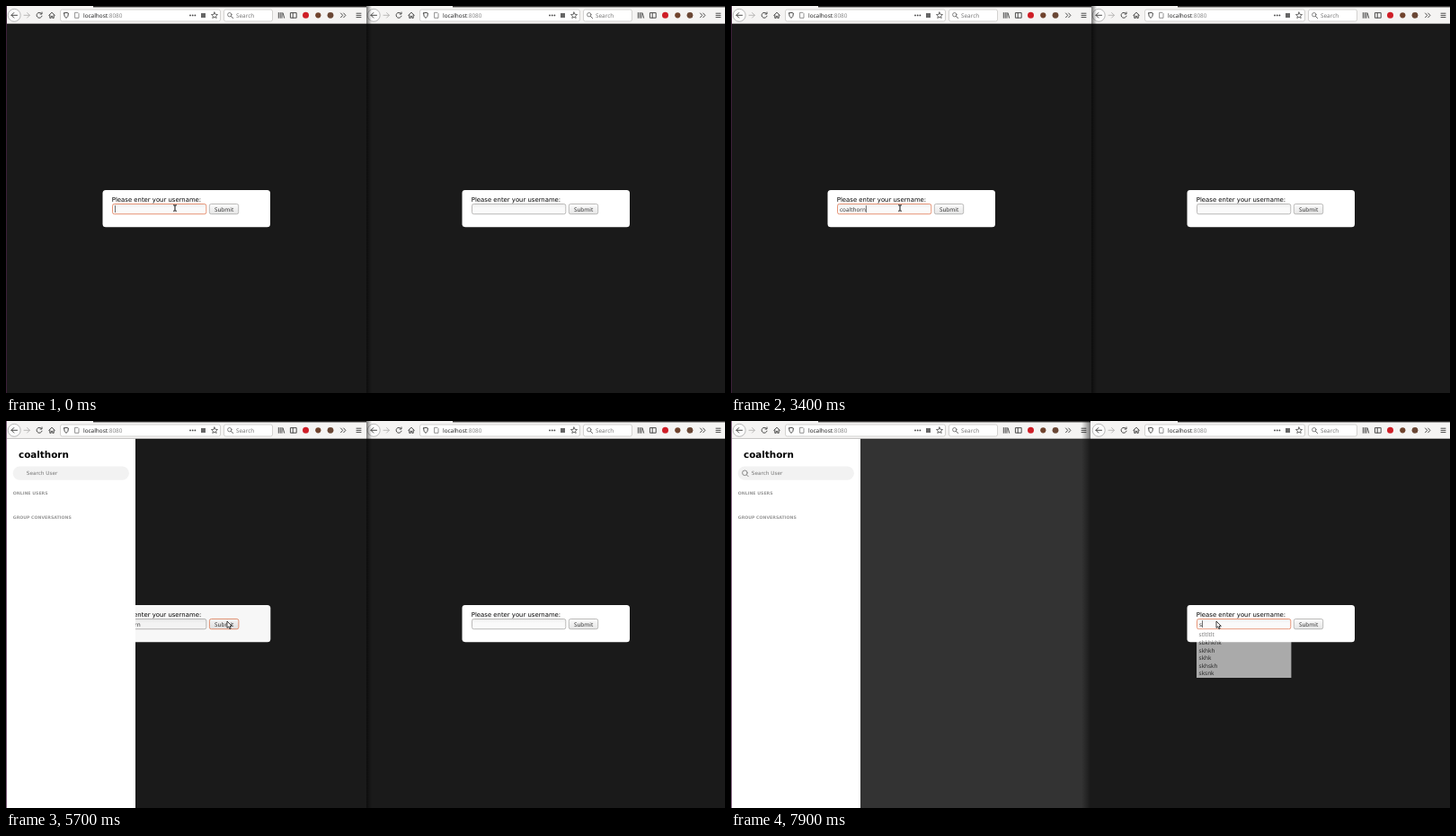
Write an HTML page that moves like this. It is 800x431 px and loops after 8000 ms.

```html
<!DOCTYPE html>
<html lang="en">
<head>
<meta charset="utf-8">
<title>Chat login in two windows</title>
<style>
  html, body { margin: 0; width: 100%; height: 100%; overflow: hidden; background: #1a1a1a; }
  svg { display: block; width: 800px; height: 431px; text-rendering: geometricPrecision; }
  .ui { font: 6.4px "Noto Sans", sans-serif; }
  .page { font: 6.88px "DejaVu Sans", sans-serif; }
  .icon { fill: none; stroke: #4b4b4a; stroke-width: 1; stroke-linecap: round; stroke-linejoin: round; }
</style>
</head>
<body>
<svg viewBox="0 0 800 431">
  <defs>
    <linearGradient id="field" x2="0" y2="1"><stop stop-color="#ededed"/><stop offset=".4" stop-color="#fafafa"/></linearGradient>
    <linearGradient id="button" x2="0" y2="1"><stop stop-color="#fcfcfc"/><stop offset="1" stop-color="#e6e6e6"/></linearGradient>
    <linearGradient id="shadow"><stop stop-opacity=".5"/><stop offset="1" stop-opacity="0"/></linearGradient>
  </defs>
  <g id="stage"></g>
</svg>
<script>
const LOOP = 8000, USER = 'coalthorn', ORANGE = '#e58a68';
const KEY_TIMES = [1700, 2100, 2200, 2300, 2700, 2900, 3000, 3300, 3400];
const SUGGESTIONS = ['stltltlt', 'sbkhkhk', 'skhkh', 'skhk', 'skhskh', 'sksnk'];
// Pointer path: time, x, y
const PATH = [
  [0, 188, 225], [4200, 188, 225], [4400, 195, 228], [4700, 218, 231.5], [5000, 238, 226],
  [5100, 239.5, 223], [5600, 239.5, 223], [5700, 246, 223], [5800, 335, 227], [5900, 441, 226],
  [6100, 505, 227], [6400, 538.5, 225], [7700, 538.5, 225], [7800, 540, 223], [8000, 540, 223]
];
const stage = document.getElementById('stage');
const ruler = document.createElement('canvas').getContext('2d');
ruler.font = '64px "Noto Sans", sans-serif';
const textWidth = s => ruler.measureText(s).width / 10;

const rect = (x, y, w, h, fill, extra = '') =>
  `<rect x="${x}" y="${y}" width="${w}" height="${h}" fill="${fill}" ${extra}/>`;
const box = (x, y, w, h, fill, stroke, r = 2) =>
  rect(x, y, w, h, fill, `rx="${r}" stroke="${stroke}" stroke-width=".9"`);
const text = (x, y, s, fill = '#111', cls = 'ui', style = '') =>
  `<text x="${x}" y="${y}" fill="${fill}" class="${cls}" style="${style}">${s}</text>`;
const icon = (d, extra = '') => `<path class="icon" d="${d}" ${extra}/>`;
const dot = (x, y, r, fill) => `<circle cx="${x}" cy="${y}" r="${r}" fill="${fill}"/>`;

function toolbar(active) {
  const dark = active ? '#2b2928' : '#3c3a39';
  return rect(0, 0, 401, 19.5, '#f5f4f3') + rect(97, 0, 304, 1.4, dark) +
    rect(0, 19, 401, .6, '#c9c7c5') +
    `<circle cx="9.2" cy="10.3" r="7" fill="#fcfcfc" stroke="#aaa" stroke-width=".8"/>` +
    icon('M12.5 10.3H6M8.8 7.5L6 10.3L8.8 13.1') +
    icon('M20 10.3H26.3M23.6 7.5L26.4 10.3L23.6 13.1', 'style="stroke:#b9b8b7"') +
    icon('M39.4 8.3A3 3 0 1 0 40 11.2M40 7V9H38') +
    icon('M47.7 10.4L51 7.2L54.3 10.4M48.8 10V13.4H50.2V11.4H51.8V13.4H53.2V10') +
    box(60.5, 4, 178, 13, '#fff', '#cfcdcb') + box(242.5, 4, 54, 13, '#fff', '#cfcdcb') +
    icon('M64.6 8L67 7.3L69.4 8Q69.6 12 67 13.5Q64.4 12 64.6 8Z', 'stroke-width=".8"') +
    icon('M77 7.3H79.8L81 8.5V13.3H77Z', 'style="stroke:#777;stroke-width:.8"') +
    text(86, 12.7, 'localhost<tspan fill="#888">:8080</tspan>', '#222') +
    dot(205, 10.4, .9, '#444') + dot(207.7, 10.4, .9, '#444') + dot(210.4, 10.4, .9, '#444') +
    rect(217, 8, 5, 5, '#666') +
    icon('M232 7L233 9.3L235.5 9.5L233.6 11.1L234.2 13.5L232 12.2L229.8 13.5L230.4 11.1L228.5 9.5L231 9.3Z', 'style="stroke-width:.8"') +
    icon('M250.4 11.4L252.6 13.6', 'style="stroke:#666"') +
    `<circle cx="248.8" cy="9.7" r="2.2" class="icon" style="stroke:#666;stroke-width:.8"/>` +
    text(256, 12.7, 'Search', '#777') +
    icon('M303.3 7.5V13.3M305.2 7.5V13.3M307 7.5V13.3M308.2 8L309.6 13.2') +
    icon('M316.8 7.6H323.2V13.2H316.8ZM319.2 7.6V13.2') +
    dot(333.5, 10.3, 3.5, '#cf1e27') + dot(347.3, 10.3, 3.1, '#70432d') + dot(361, 10.3, 3.4, '#6a4735') +
    icon('M372.5 8L374.7 10.4L372.5 12.8M375.7 8L377.9 10.4L375.7 12.8') +
    icon('M390 8.2H395M390 10.4H395M390 12.6H395');
}

function form(value, focus, caret) {
  const edge = name => focus === name ? ORANGE : '#b4b3b2';
  return rect(107.5, 205, 186.5, 41.2, '#fff', 'rx="3.5"') +
    text(117.8, 218, 'Please enter your username:', '#000', 'page') +
    box(118.5, 220.5, 104.3, 11.2, 'url(#field)', edge('field')) +
    text(121, 228.5, value, '#333') +
    (caret ? rect(121 + textWidth(value), 222.2, .7, 7.8, '#333') : '') +
    box(226.3, 220.5, 32.4, 11.2, 'url(#button)', edge('button')) +
    text(231.9, 228.5, 'Submit', '#333');
}

function sidebar(showLens) {
  const heading = (y, s) => text(7.8, y, s, '#9a9a9a', 'page', 'font-size:4.7px;font-weight:bold');
  return rect(1, 19.5, 143, 412, '#fff') +
    text(14, 40.6, USER, '#000', 'page', 'font-size:10.4px;font-weight:bold') +
    rect(7.7, 50.6, 129.2, 15.2, '#f2f2f2', 'rx="7.6"') +
    (showLens ? `<circle cx="15.4" cy="57.8" r="2.8" class="icon" style="stroke:#888"/>` +
      icon('M17.5 60L19.3 61.8', 'style="stroke:#888"') : '') +
    text(22.8, 60.3, 'Search User', '#777', 'page', 'font-size:5.74px') +
    heading(81.7, 'ONLINE USERS') + heading(108.7, 'GROUP CONVERSATIONS');
}

function leftWindow(t) {
  const typed = USER.slice(0, KEY_TIMES.filter(k => t >= k).length);
  const joined = t >= 5700;
  const veil = !joined ? 1 : t < 5800 ? .97 : t < 5900 ? .5 : t < 6000 ? .1 : 0;
  const scale = 1 + .11 * (1 - veil);
  const focus = t < 5000 ? 'field' : 'button';
  const caret = t < 900 || t >= 1700 && t < 5000;
  return rect(0, 0, 401, 431, '#333') + rect(0, 0, 401, 431, '#000', `opacity="${veil / 2}"`) +
    `<g opacity="${veil}" transform="translate(200.75 225.6) scale(${scale}) translate(-200.75 -225.6)">` +
    form(typed, focus, caret) + '</g>' +
    (joined ? sidebar(t >= 6000) : '') + toolbar(t < 6800) +
    rect(0, 0, 1, 431, joined ? '#7b5a78' : '#3c2039');
}

function suggestions(alpha) {
  return `<g opacity="${alpha}">` + rect(118, 232, 105.4, 54, '#fff') +
    SUGGESTIONS.map((s, i) => text(120.6, 240.2 + i * 8.65, s, '#2e2e2e')).join('') + '</g>';
}

function rightWindow(t) {
  const focused = t >= 6900;
  return '<g transform="translate(400)">' + rect(0, 0, 400, 431, '#1a1a1a') +
    form(t >= 7800 ? 's' : '', focused ? 'field' : '', focused) +
    (t >= 7900 ? suggestions(.63) : '') + toolbar(t >= 6800) + '</g>';
}

function pointer(t) {
  const i = PATH.findIndex(p => p[0] > t);
  const [a, b] = [PATH[i - 1], PATH[i]];
  const p = (t - a[0]) / (b[0] - a[0]);
  const x = a[1] + (b[1] - a[1]) * p, y = a[2] + (b[2] - a[2]) * p;
  const overField = y < 232 && (x < 223 || x > 518 && t < 7800);
  const shape = overField
    ? '<path d="M-2 -3.3Q0 -3.3 0 -2.4Q0 -3.3 2 -3.3M0 -2.4V2.4M-2 3.3Q0 3.3 0 2.4Q0 3.3 2 3.3" fill="none" stroke="#222" stroke-width="1.1"/>'
    : '<path d="M0 0V7.4L1.7 5.9L2.9 8.6L4.2 8L3 5.4H5.3Z" fill="#fff" stroke="#111" stroke-width=".8"/>';
  return `<g transform="translate(${x} ${y})">${shape}</g>`;
}

function scene(t) {
  const left = leftWindow(t), right = rightWindow(t);
  const windows = t < 6800
    ? right + rect(401, 0, 6, 431, 'url(#shadow)') + left
    : left + rect(-400, 0, 10, 431, 'url(#shadow)', 'transform="scale(-1 1)"') + right;
  return windows + pointer(t);
}

let shown = -1;
function tick() {
  const t = Math.floor(performance.now() % LOOP / 100) * 100;
  if (t !== shown) stage.innerHTML = scene(shown = t);
  requestAnimationFrame(tick);
}
tick();
</script>
</body>
</html>
```
